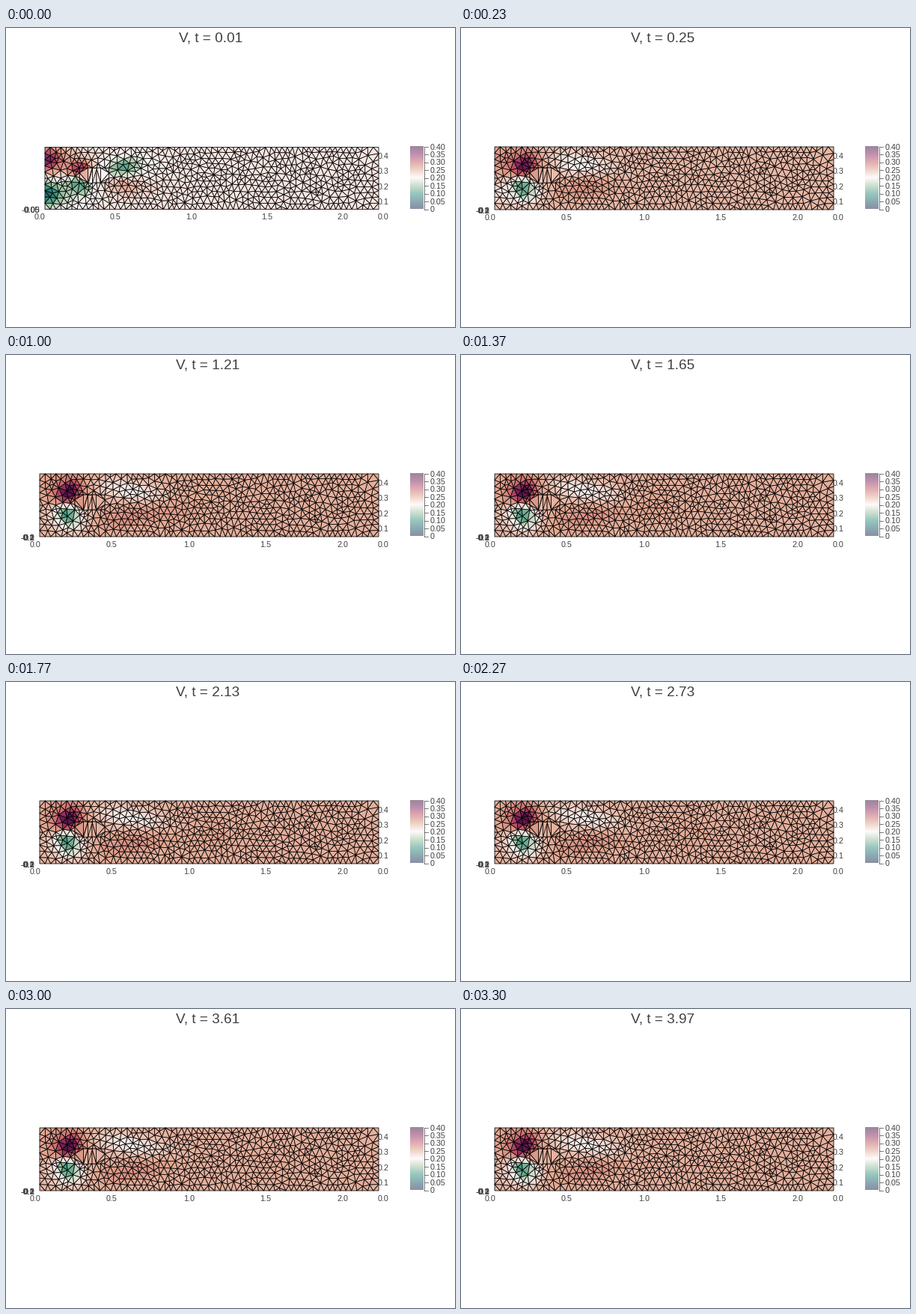
Write a matplotlib script that moves like this. It is 600 by 400 pixels and loops after 3330 ms.

```python
import numpy as np
import matplotlib.pyplot as plt
from matplotlib.animation import FuncAnimation
from matplotlib.collections import PolyCollection
from matplotlib.colors import LinearSegmentedColormap
from matplotlib.tri import Triangulation

W, H, DPI = 600, 400, 100
FRAMES, LOOP_MS = 100, 3330
GREY = "#404040"
PX = 72 / DPI

plt.rcParams["font.family"] = "Liberation Sans"

curl = LinearSegmentedColormap.from_list(
    "curl", ["#141d43", "#165a69", "#32917e", "#a0c1a2", "#fef6f5",
             "#e2a690", "#c35a64", "#82205d", "#330d35"], N=512)

# Channel and obstacle, in pixels of the settled view
LEFT, RIGHT, TOP, BOTTOM = 45, 498, 159, 243
OBSTACLE = 92, 132, 187, 207
MID = 199


def box_points(x0, x1, y0, y1, nx, ny):
    xs, ys = np.linspace(x0, x1, nx + 1), np.linspace(y0, y1, ny + 1)[1:-1]
    sides = [np.column_stack([xs, np.full_like(xs, y)]) for y in (y0, y1)]
    sides += [np.column_stack([np.full_like(ys, x), ys]) for x in (x0, x1)]
    return np.vstack(sides)


def inside(x, y, box, margin):
    x0, x1, y0, y1 = box
    return ((x > x0 - margin) & (x < x1 + margin)
            & (y > y0 - margin) & (y < y1 + margin))


def make_mesh(step=8.9, rounds=4):
    """Jittered grid around the obstacle, relaxed towards its neighbours."""
    rng = np.random.default_rng(7)
    channel = LEFT, RIGHT, TOP, BOTTOM
    fixed = np.vstack([box_points(*channel, 62, 10),
                       box_points(*OBSTACLE, 7, 3)])
    rows = np.arange(TOP + 7, BOTTOM - 4, step * .866)
    inner = np.array([(x + step / 2 * (i % 2), y) for i, y in enumerate(rows)
                      for x in np.arange(LEFT + 6, RIGHT - 7, step)])
    inner += rng.uniform(-4, 4, inner.shape)
    keep = inside(*inner.T, channel, -4) & ~inside(*inner.T, OBSTACLE, 4)
    pts = np.vstack([fixed, inner[keep]])
    n = len(fixed)
    for _ in range(rounds):
        a, b = Triangulation(*pts.T).edges.T
        total, count = np.zeros_like(pts), np.zeros(len(pts))
        for p, q in ((a, b), (b, a)):
            np.add.at(total, p, pts[q])
            np.add.at(count, p, 1)
        mean = total / count[:, None]
        pts[n:] += .4 * (mean[n:] - pts[n:])
    return pts, Triangulation(*pts.T).triangles


nodes, tris = make_mesh()
NX, NY = nodes.T


def lobes(x, gap, sx, sy, slope=0, low=1):
    """Positive lobe above the midline, its mirrored negative below."""
    side = np.clip((MID - NY) / 4, -1, 1)
    dist = np.abs(NY - MID) - gap - slope * (NX - x)
    shape = np.exp(-((NX - x) / sx) ** 2 / 2 - (dist / sy) ** 2 / 2)
    return np.where(side < 0, low, 1) * side * shape


INLET = .32 * lobes(47, 23, 12, 10) + .10 * lobes(66, 24, 24, 12)
CORNERS = .32 * lobes(91, 11, 10, 6, .2)
START = (.525 + INLET + CORNERS - .24 * lobes(151, 13, 13, 7, .2, .25)
         - .05 * lobes(160, 13, 28, 9))
SETTLED = .61 + .32 * lobes(83, 15, 9, 8, .4) + .12 * lobes(82, 19, 17, 12)


def wake(t):
    grown = 1 - np.exp(-t / .7)
    strip = .12 * lobes(160 + 6 * grown, 18, 26 + 6 * grown, 8, -.16, .5)
    front_x = 170 + 50 * t
    strength = .05 * grown * np.exp(-.5 * t)
    front = np.exp(-((NX - front_x) / (16 + 4 * t)) ** 2 / 2
                   - ((NY - 205) / 13) ** 2 / 2)
    return strength * front - strip


def field(i):
    blend = np.exp(-i / 3)
    settled = SETTLED + wake(.01 + .04 * i)
    return blend * START + (1 - blend) * settled


fig = plt.figure(figsize=(W / DPI, H / DPI), dpi=DPI, facecolor="white")
ax = fig.add_axes([0, 0, 1, 1])
ax.axis("off")


def label(x, y, s, size=10.8, ha="center"):
    return ax.text(x, y + .36 * size, s, fontsize=size * PX, color=GREY,
                   ha=ha, va="baseline")


def axis_labels(x0, dx, y, depth):
    made = [label(x0 + dx * k, y, f"{k / 2:.1f}") for k in range(5)]
    made.append(label(504, y, "0.0"))
    made += [label(x0, y - 9, s, ha="right") for s in depth]
    return made


early = axis_labels(45, 101.3, 252, ["-0.05", "0.00", "0.05"])
late = axis_labels(38.5, 102.9, 253, ["-0.2", "-0.1", "0.0", "0.1", "0.2"])
for k in range(1, 5):
    label(497, 252.5 - 20.4 * k, f"{k / 10:.1f}", ha="left")

# Colour bar
ax.imshow(np.linspace(0, 1, 256)[:, None], cmap=curl, alpha=.5,
          extent=(540, 558, 242.5, 159), origin="upper", aspect="auto"
          ).set_data(np.linspace(1, 0, 256)[:, None])
ax.plot([558.5, 558.5], [159, 242.5], color=GREY, lw=.7 * PX)
for k in range(9):
    y = 242.5 - k * 83.5 / 8
    ax.plot([558.5, 564], [y, y], color=GREY, lw=.7 * PX)
    label(566.5, y - .3, f"{k * .05:.2f}" if k else "0", ha="left")

title = label(270, 11.8, "", size=19)
late_verts = nodes[tris]
early_verts = np.stack([
    52 + (late_verts[..., 0] - LEFT) * (RIGHT - 52) / (RIGHT - LEFT),
    159.5 + (late_verts[..., 1] - TOP) * 83 / (BOTTOM - TOP)], axis=-1)
mesh = PolyCollection(late_verts, edgecolors="black", linewidths=.8 * PX,
                      zorder=0)
ax.add_collection(mesh)
ax.set_xlim(0, W)
ax.set_ylim(H, 0)


def update(i):
    first = i == 0
    mesh.set_verts(early_verts if first else late_verts)
    mesh.set_facecolor(curl(np.clip(field(i)[tris].mean(axis=1), 0, 1)))
    for t in early:
        t.set_visible(first)
    for t in late:
        t.set_visible(not first)
    title.set_text(f"V, t = {.01 + .04 * i:.2f}")
    title.set_x(273.5 if first else 270)
    return [mesh, title, *early, *late]


anim = FuncAnimation(fig, update, frames=FRAMES, interval=LOOP_MS / FRAMES,
                     repeat=True, repeat_delay=0, blit=False)
plt.show()
```
